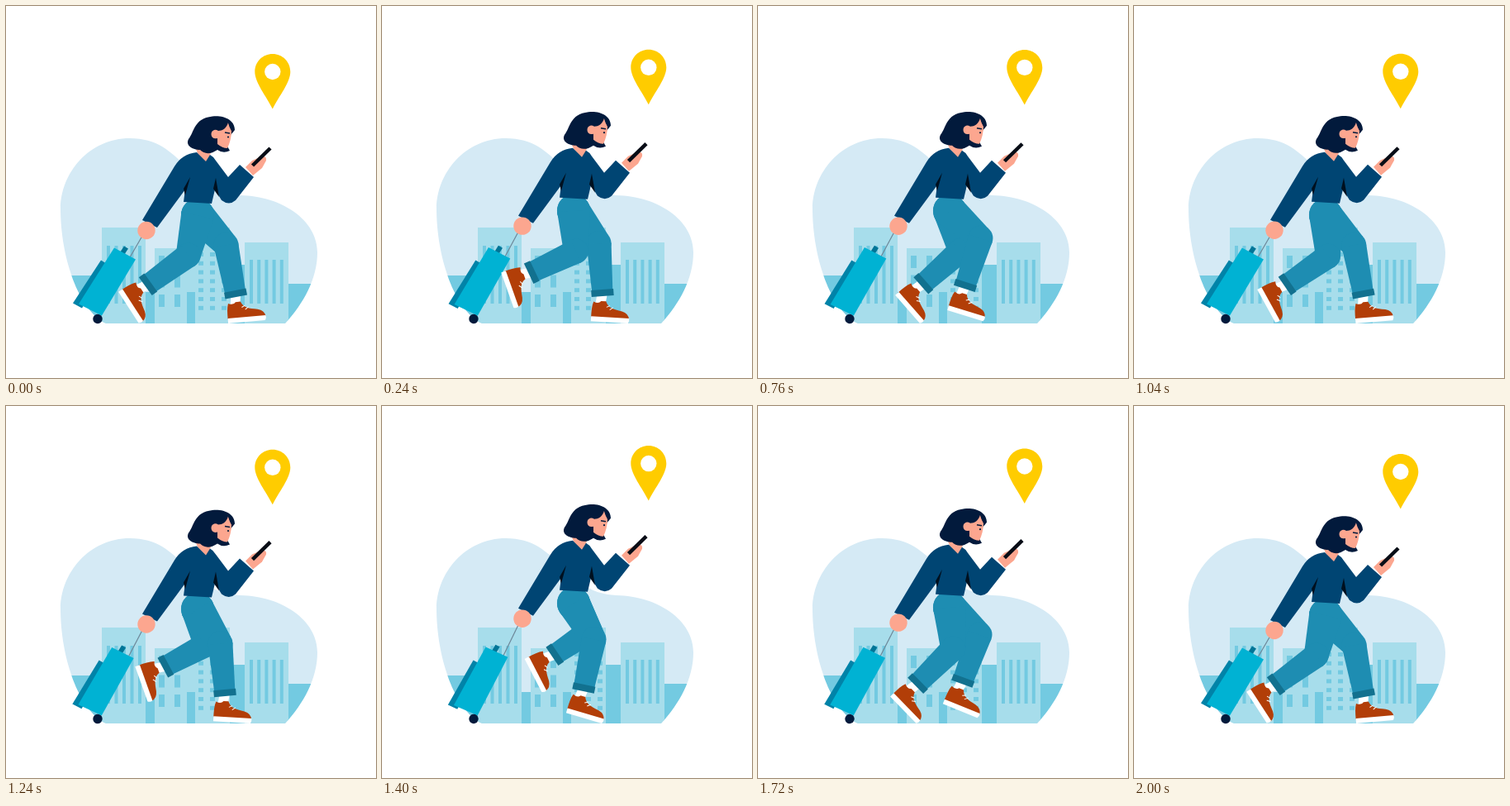
Write an HTML page with a canvas that moves like this. It is 448 px wide and 450 px high and loops after 2040 ms.

```html
<!DOCTYPE html>
<html lang="en">
<head>
<meta charset="utf-8">
<title>Traveller</title>
<style>
html, body { margin: 0; width: 100%; height: 100%; overflow: hidden; background: #fff; }
canvas { display: block; }
</style>
</head>
<body>
<canvas id="stage" width="448" height="450"></canvas>
<script>
const ctx = document.getElementById('stage').getContext('2d');
const LOOP = 2040, CYCLE = 2000, GROUND = 384;
const SKIN = '#fca68f', HAIR = '#021a3c', SWEATER = '#004573', SHADE = '#00101f';
const PANTS = '#1e8db2', CUFF = '#12718f', LEATHER = '#b23e08';
const HAZE = '#a7ddeb', DEEP = '#73cae1';
const HIP = { x: 232, y: 253 }, THIGH = 50, SHANK = 60, SOLE = 45;

function fill(color, d) {
  ctx.fillStyle = color;
  ctx.fill(typeof d === 'string' ? new Path2D(d) : d);
}

function rect(color, x, y, w, h) {
  ctx.fillStyle = color;
  ctx.fillRect(x, y, w, h);
}

function dot(color, x, y, r) {
  ctx.fillStyle = color;
  ctx.beginPath();
  ctx.arc(x, y, r, 0, 7);
  ctx.fill();
}

function line(color, width, x1, y1, x2, y2) {
  ctx.strokeStyle = color;
  ctx.lineWidth = width;
  ctx.beginPath();
  ctx.moveTo(x1, y1);
  ctx.lineTo(x2, y2);
  ctx.stroke();
}

function windows(x, y, cols, rows, stepX, stepY, w, h) {
  for (let i = 0; i < cols; i++)
    for (let j = 0; j < rows; j++) rect(DEEP, x + i * stepX, y + j * stepY, w, h);
}

function placed(draw, x, y, angle = 0) {
  ctx.save();
  ctx.translate(x, y);
  ctx.rotate(angle);
  draw();
  ctx.restore();
}

function taper(color, a, r1, b, r2) {
  const t = Math.atan2(b.y - a.y, b.x - a.x), nx = -Math.sin(t), ny = Math.cos(t);
  ctx.fillStyle = color;
  ctx.beginPath();
  ctx.moveTo(a.x + nx * r1, a.y + ny * r1);
  ctx.lineTo(b.x + nx * r2, b.y + ny * r2);
  ctx.lineTo(b.x - nx * r2, b.y - ny * r2);
  ctx.lineTo(a.x - nx * r1, a.y - ny * r1);
  ctx.fill();
}

// Heel path: the toe rolls along the ground in stance, then the foot lifts and swings forward
function footAt(phase, reach, height) {
  const c = Math.cos(phase), swing = Math.max(0, -Math.sin(phase));
  const angle = (26 - 31 * c + swing * (26 - 8 * c)) * Math.PI / 180;
  return {
    angle,
    x: 269 + reach * (c - 1) - swing * (23 + 12 * c),
    y: GROUND - 1 - SOLE * Math.max(0, Math.sin(angle)) - height * swing * swing * (1 - c)
  };
}

// Point in shoe coordinates, moved to the stage
function onFoot(foot, x, y) {
  const c = Math.cos(foot.angle), s = Math.sin(foot.angle);
  return { x: foot.x + x * c - y * s, y: foot.y + x * s + y * c };
}

// Two-bone joint that bends forward
function kneeBetween(hip, cuff) {
  const dx = cuff.x - hip.x, dy = cuff.y - hip.y, d = Math.hypot(dx, dy);
  const along = (THIGH ** 2 - SHANK ** 2 + d * d) / (2 * d);
  const bend = Math.min(30, Math.sqrt(Math.max(0, THIGH ** 2 - along ** 2)));
  return { x: hip.x + (dx * along + dy * bend) / d, y: hip.y + (dy * along - dx * bend) / d };
}

function shoe() {
  fill(LEATHER, 'M0-4 C0-11 0-18 2-23 Q8-20 11-24 L17-24 C20-16 26-15 37-13 Q45-11 46-4Z');
  fill('#fff', 'M0-5H46Q47-2 45 1H0Z');
  line('#fff', 1, 18, -17, 22, -19);
  line('#fff', 1, 22, -14, 26, -17);
}

function leg(phase, reach, height, lift) {
  const foot = footAt(phase, reach, height);
  const hip = { x: HIP.x, y: HIP.y + lift }, cuff = onFoot(foot, 12, -34);
  const knee = kneeBetween(hip, cuff), ankle = onFoot(foot, 10, -18);
  line('#fff', 12, cuff.x, cuff.y, ankle.x, ankle.y);
  placed(shoe, foot.x, foot.y, foot.angle);
  dot(PANTS, hip.x, hip.y, 20);
  taper(PANTS, hip, 20, knee, 15);
  dot(PANTS, knee.x, knee.y, 15);
  taper(PANTS, knee, 15, cuff, 12.5);
  const dx = cuff.x - knee.x, dy = cuff.y - knee.y, k = 4 / Math.hypot(dx, dy);
  line(CUFF, 27, cuff.x - dx * k, cuff.y - dy * k, cuff.x + dx * k, cuff.y + dy * k);
}

const blob = new Path2D('M66 245 C66 203 100 160 150 160 C216 160 218 226 284 229 ' +
  'C334 230 377 259 377 298 C377 330 360 360 338 384 H121 C88 368 66 304 66 245Z');

function city() {
  fill('#d5eaf5', blob);
  ctx.save();
  ctx.clip(blob);
  rect(DEEP, 60, 326, 60, 58);
  rect(DEEP, 168, 346, 14, 38);
  rect(DEEP, 270, 313, 20, 71);
  rect(DEEP, 341, 336, 40, 48);
  rect(HAZE, 116, 268, 53, 116);
  windows(122, 290, 5, 1, 9.5, 0, 4, 70);
  rect(HAZE, 180, 293, 49, 91);
  windows(185, 302, 2, 3, 19, 23.5, 7, 15);
  rect(DEEP, 219, 346, 10, 38);
  rect(HAZE, 229, 268, 42, 116);
  windows(233, 298, 3, 7, 14, 10.8, 6, 5);
  rect(HAZE, 289, 286, 53, 98);
  windows(295, 307, 5, 1, 9.2, 0, 4, 53);
  ctx.restore();
}

function pin() {
  fill('#ffcc00', 'M0-21.5 C12-21.5 21.5-12 21.5 0 C21.5 13 8 29 0 45 C-8 29-21.5 13-21.5 0 C-21.5-12-12-21.5 0-21.5Z');
  dot('#fff', 0, 0, 9.7);
}

// Drawn around the wheel
function suitcase() {
  fill('#0083a8', 'M4-71 L12-66 L-19-13 L-30-19Z');
  fill('#007597', 'M26-79 L32-88 L37-85 L31-76Z');
  fill('#00b2d3', 'M20-86 L46-72 L5-4 L-23-18Z');
  dot(HAIR, 0, 0, 5.7);
}

function body() {
  fill(SKIN, 'M228 168 H250 L247 181 L242 190 L232 178Z');
  fill(SWEATER, 'M231 177 L242 188 L247 180 Q251 182 254 187 L269 207 L283 192 L300 207 ' +
    'L278 235 Q270 242 261 235 L253 222 L249 239 L215 237 L217 222 L183 268 L165 259 ' +
    'L204 194 Q213 179 231 177Z');
  fill(SHADE, 'M223 207 L215 221 L217 229Z');
  fill(SHADE, 'M254 208 L251 221 L258 231Z');
  fill(SKIN, 'M290 195 L298 187 L307 183 Q316 180 315 187 L310 196 L299 205Z');
  line('#080d16', 4.5, 298.5, 193, 320, 172);
  dot(SKIN, 170, 271.5, 10.7);
}

function head() {
  fill(HAIR, 'M250 133.5 C264 132 277 138 277 150 L272 156 L267 168 L271 175 Q263 179 256 174 ' +
    'C247 180 240 179 235 174 C226 174 217 169 221 161 C228 153 227 136 250 133.5Z');
  fill(SKIN, 'M269 141 C267 148 262 151 257 151 C251 147 246 154 250 159 Q252 161 256 160 ' +
    'L256 167 Q262 172 268 172 C271 166 273 158 273 151Z');
  fill(HAIR, 'M269 140 Q277 143 275 153 Q270 148 269 140Z');
  line(HAIR, 1.6, 265, 153, 271, 154);
  dot(HAIR, 269, 158.5, 1.1);
}

function frame(now) {
  const t = Math.min(now % LOOP, CYCLE - .01);
  const phase = t / CYCLE * 2 * Math.PI;
  const bob = Math.sin(phase) ** 2;
  const bounce = t < CYCLE / 2 ? 11.3 : 15.8;  // the second step springs higher
  const lift = -bounce * bob;
  rect('#fff', 0, 0, 448, 450);
  city();
  placed(pin, 322.8, 79.5 - 11 * bob);
  line('#6d8798', 1.2, 168, 273 + lift, 150 + lift * .28, 304);
  placed(suitcase, 111, 378.5, lift * .0044);
  leg(phase, 59, 2 * bounce, lift);
  leg(phase + Math.PI, 66, 2 * bounce, lift);
  placed(() => { body(); head(); }, 0, lift);
  requestAnimationFrame(frame);
}
requestAnimationFrame(frame);
</script>
</body>
</html>
```
